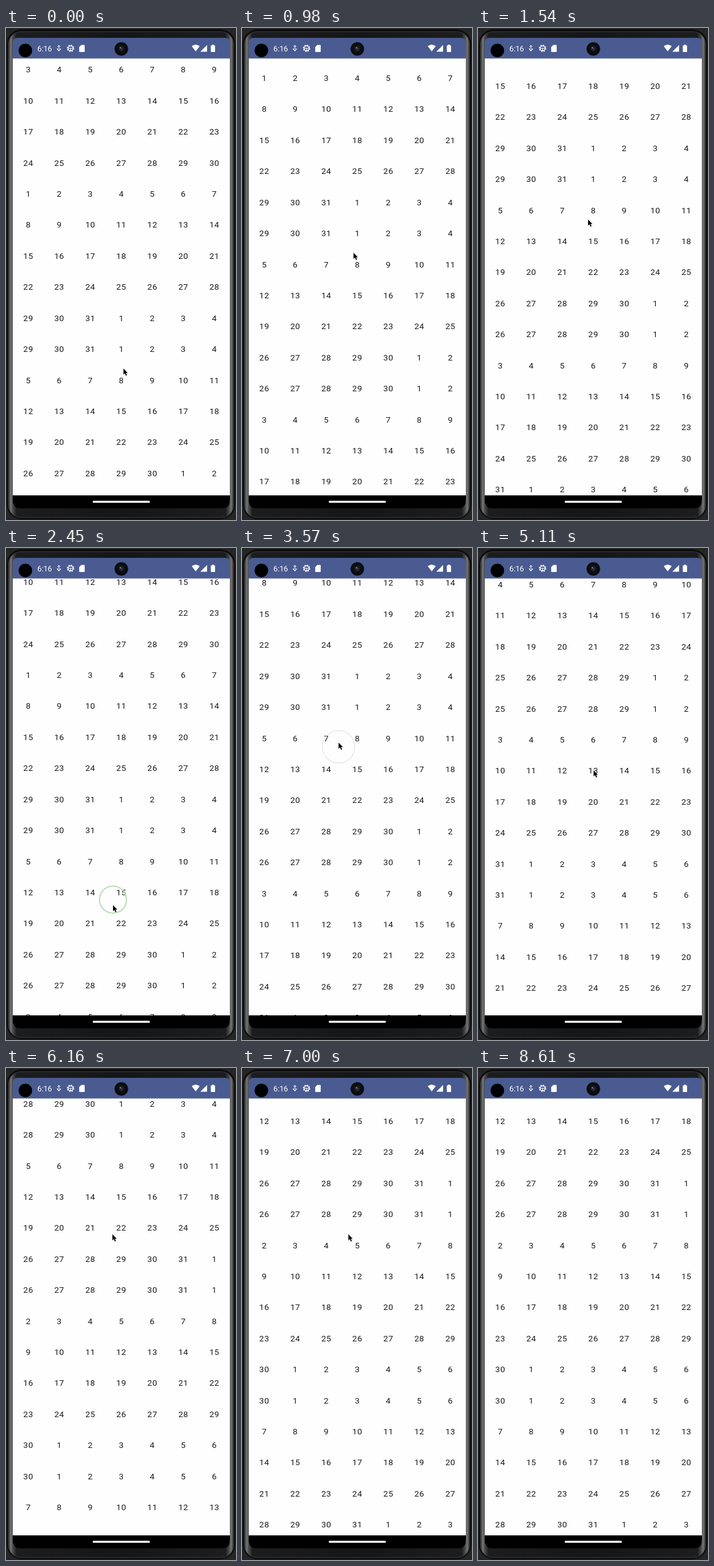
Animation, 374 px wide and 799 px high, one loop 8680 ms. Source, as an HTML page:

```html
<!DOCTYPE html>
<html lang="en">
<head>
<meta charset="utf-8">
<title>Scrolling calendar</title>
<style>
  html, body { margin: 0; width: 100%; height: 100%; overflow: hidden; background: #242526; }
  #stage { position: relative; width: 374px; height: 799px; overflow: hidden; }
  svg { position: absolute; left: 0; top: 0; }
  #screen { position: absolute; left: 11px; top: 50px; width: 353px; height: 709px; overflow: hidden; }
  #days {
    display: grid; grid-template-columns: repeat(7, 1fr); grid-auto-rows: 50.42px;
    font: 13.7px/50.42px Roboto, sans-serif; letter-spacing: .43px; text-align: center; color: #1b1b1f;
  }
</style>
</head>
<body>
<div id="stage">
  <svg width="374" height="799">
    <defs>
      <linearGradient id="bezel" gradientUnits="userSpaceOnUse" x2="187" spreadMethod="reflect">
        <stop offset=".02" stop-color="#2a2b2c"/>
        <stop offset=".042" stop-color="#777"/>
        <stop offset=".056" stop-color="#505152"/>
        <stop offset=".09" stop-color="#1c1d1e"/>
        <stop offset="1" stop-color="#151617"/>
      </linearGradient>
      <radialGradient id="lens">
        <stop offset="0" stop-color="#3d4350"/>
        <stop offset=".4" stop-color="#1c2027"/>
        <stop offset="1" stop-color="#090a0c"/>
      </radialGradient>
    </defs>
    <rect width="374" height="799" fill="#242526"/>
    <rect x="1" y="2" width="372" height="796" rx="25" fill="#0c0c0d"/>
    <rect x="4" y="6" width="366" height="789" rx="20" fill="url(#bezel)" stroke="#3c3d3e"/>
    <path d="M11 45H364V760H11Z" fill="#fefefe"/>
    <path d="M11 49.5V24q0-8 8-8H356q8 0 8 8V49.5Z" fill="#4a5b92"/>
    <path d="M11 759H364V767q0 13-13 13H24q-13 0-13-13Z"/>
    <rect x="141" y="767.7" width="93" height="3.4" rx="1.7" fill="#fff"/>
    <circle cx="31.5" cy="36.5" r="11"/>
    <circle cx="187.5" cy="34" r="11" fill="#0b0c0f"/>
    <circle cx="187.5" cy="33.5" r="7" fill="url(#lens)"/>
    <circle cx="186" cy="32" r="1" fill="#8b92a2"/>
    <g fill="#fff">
      <text x="51" y="38" font-family="Roboto, sans-serif" font-size="12.3">6:16</text>
      <path d="M84 30.5l2-2 2 2M83 33.5l3 3.500 3-3.500M86 31v3" fill="none" stroke="#fff" stroke-width="1.2"/>
      <circle cx="105" cy="33" r="4" fill="none" stroke="#fff" stroke-width="1.4"/>
      <circle cx="105" cy="33" r="5.2" fill="none" stroke="#fff" stroke-width="1.6" stroke-dasharray="2 2.08"/>
      <path d="M101.500 33h7M105 33v3.500" stroke="#fff"/>
      <path d="M122.500 27.500H127q1 0 1 1V38q0 1-1 1H120q-1 0-1-1V31Z"/>
      <path d="M302 29.500q6.500-5 13 0L308.500 38Z"/>
      <path d="M316 38.500L327 27.500V38.500Z"/>
      <path d="M335 27h3v1.300h1q1 0 1 1V38q0 1-1 1h-5q-1 0-1-1V29.300q0-1 1-1h1Z"/>
    </g>
  </svg>
  <div id="screen"><div id="days"></div></div>
  <svg width="374" height="799">
    <circle id="ripple" fill="none"/>
    <path id="pointer" d="M1 1V11L3.300 8.800L5 12.700L6.700 12L5.100 8.200H8Z" stroke="#fff" paint-order="stroke"/>
  </svg>
</div>
<script>
const LOOP = 8680, STEP = 70, ROW = 50.42;
const FLING_TIME = 1100, APPROACH = 250, COAST = 8;
const START_X = 190, LEAVE = 7280;

// Swipes: the pointer drags the list from one height to another, then the list coasts on.
const swipes = [
  { press: 630, release: 1050, from: 552, to: 318, x: 178, fling: 46.4 },
  { press: 1820, release: 2380, from: 372, to: 571, x: 173, fling: -77.4 },
  { press: 3010, release: 3430, from: 512, to: 323, x: 156, fling: 168 },
  { press: 4060, release: 4340, from: 585, to: 330, x: 180, fling: 287 },
  { press: 4620, release: 4900, from: 623, to: 368, x: 187, fling: 287 },
  { press: 5500, release: 5873, from: 570, to: 277, x: 172, fling: 411 }
];

const $ = id => document.getElementById(id);
const progress = (t, start, end) => Math.min(1, Math.max(0, (t - start) / (end - start)));
const mix = (a, b, u) => a + (b - a) * u;
const smooth = u => u * u * (3 - 2 * u);
const dragged = (s, t) => progress(t, s.press, s.release) ** 1.2;

// Every month lists its whole weeks, so weeks shared by two months appear twice.
function fillCalendar(year, firstMonth, count) {
  let html = '';
  for (let m = firstMonth; m < firstMonth + count; m++) {
    const lead = new Date(year, m, 1).getDay();
    const length = new Date(year, m + 1, 0).getDate();
    const cells = Math.ceil((lead + length) / 7) * 7;
    for (let i = 0; i < cells; i++)
      html += `<span>${new Date(year, m, 1 - lead + i).getDate()}</span>`;
  }
  $('days').innerHTML = html;
}

function scroll(t) {
  return swipes.reduce((sum, s) => {
    const rest = (1 - progress(t, s.release, s.release + FLING_TIME)) ** 4;
    return sum + (s.from - s.to) * dragged(s, t) + s.fling * (1 - rest);
  }, 0);
}

function pointerAt(t) {
  let x = START_X, y = swipes[0].from;
  for (const s of swipes) {
    y = mix(y, s.from, smooth(progress(t, s.press - APPROACH, s.press)));
    x = mix(x, s.x, dragged(s, t));
    y += (s.to - s.from) * dragged(s, t);
    y += Math.sign(s.to - s.from) * COAST * progress(t, s.release, s.release + STEP);
  }
  const away = smooth(progress(t, LEAVE, LEAVE + 350));
  return { x: mix(x, -20, away), y: mix(y, 180, away) };
}

function drawRipple(t) {
  const swipe = swipes.find(s => t >= s.release && t - s.release < 200);
  const ripple = $('ripple');
  ripple.style.display = swipe ? '' : 'none';
  if (!swipe) return;
  const age = t - swipe.release;
  ripple.setAttribute('cx', swipe.x + 1);
  ripple.setAttribute('cy', swipe.to);
  ripple.setAttribute('r', 17.5 + age * .064);
  ripple.setAttribute('stroke', `hsl(113, ${70 - age * .5}%, ${72 + age * .11}%)`);
  ripple.setAttribute('stroke-width', 3 - age * .014);
}

function draw(t) {
  const { x, y } = pointerAt(t);
  $('days').style.transform = `translateY(${18 - ROW * 6.5 - scroll(t)}px)`;
  $('pointer').setAttribute('transform', `translate(${x} ${y})`);
  drawRipple(t);
}

fillCalendar(2023, 7, 15);
const begin = performance.now();
(function tick() {
  const t = (performance.now() - begin) % LOOP;
  draw(Math.floor(t / STEP) * STEP);
  requestAnimationFrame(tick);
})();
</script>
</body>
</html>
```
